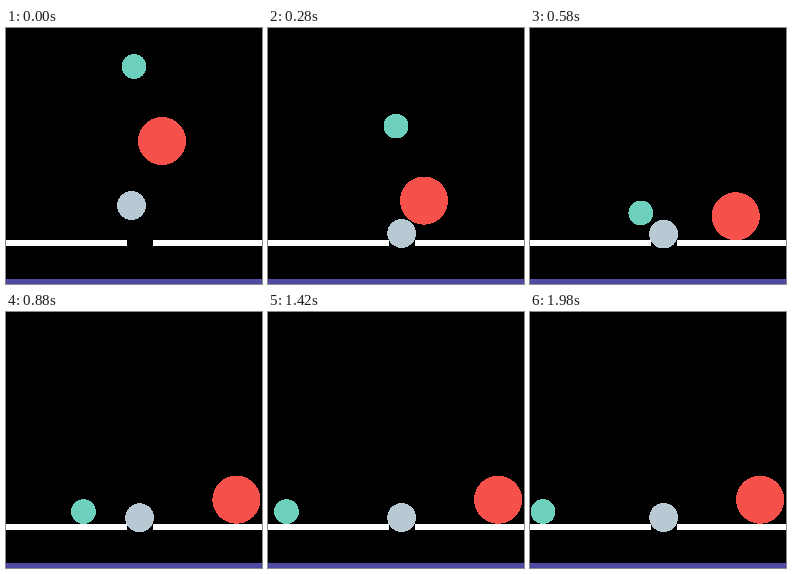
An HTML page with a canvas that plays this animation: 256x256 px, repeating every 2 s.

```html
<!DOCTYPE html>
<html lang="en">
<head>
<meta charset="utf-8">
<title>Falling balls</title>
<style>
  html, body { margin: 0; width: 100%; height: 100%; overflow: hidden; background: #000; }
  canvas { display: block; width: 256px; height: 256px; }
</style>
</head>
<body>
<canvas id="stage" width="256" height="256"></canvas>
<script>
const ctx = document.getElementById('stage').getContext('2d');
const LOOP = 2000, STEP = 20, HALF_G = 760;
const FLOOR = 212, GAP_LEFT = 121, GAP_RIGHT = 147;

// Moments of contact, in seconds
const GREY_LANDS = 0.165, RED_HITS = 0.284, GREEN_HITS = 0.428, RED_WALL = 0.736, GREEN_WALL = 1.475;

const fall = (y, v, t) => y + v * t + HALF_G * t * t;
const decay = (t, rate) => Math.exp(-t * rate);

// Drops onto the grey ball, glances left and rolls to the wall
function green(t) {
  const s = t - GREEN_HITS;
  if (s < 0) return [128, fall(38.5, 0, t)];
  const x = t < GREEN_WALL
    ? 128 - 113 * s + 2.6 * s * s
    : 13 - 0.6 * decay(t - GREEN_WALL, 20);
  return [Math.max(12.4, x), Math.min(199.6, fall(178, -70, s))];
}

// Glances right, sinks slightly into the floor and rebounds off the wall
function red(t) {
  const s = t - RED_HITS, w = t - RED_WALL;
  if (s < 0) return [156, fall(113, 0, t)];
  const rest = 187.7 + 1.5 * decay(t - 0.38, 5);
  if (w < 0) return [156 + 168 * s, Math.min(rest, fall(174.3, 155, s))];
  const rebound = decay(w, 12);
  return [230.1 + 1.8 * rebound, rest - rebound];
}

// Rolls over the left corner into the gap, then is nudged by the others
function grey(t) {
  if (t < GREY_LANDS) return [125.5, fall(177.5, 0, t)];
  if (t < RED_HITS) {
    const x = Math.min(133.6, 125.5 + 80 * (t - GREY_LANDS));
    return [x, FLOOR - Math.sqrt(14.2 ** 2 - (x - GAP_LEFT) ** 2)];
  }
  if (t < GREEN_HITS) return [131.9, 204.6];
  const s = t - GREEN_HITS;
  return [133.6 - 1.5 * decay(s, 30), 205.5 + 0.9 * decay(s, 3)];
}

// Hard-edged disc, drawn row by row
function ball([x, y], r, color) {
  ctx.fillStyle = color;
  for (let row = Math.floor(y - r); row <= y + r; row++) {
    const dy = row + 0.5 - y;
    if (Math.abs(dy) >= r) continue;
    const half = Math.sqrt(r * r - dy * dy);
    const left = Math.round(x - half);
    ctx.fillRect(left, row, Math.round(x + half) - left, 1);
  }
}

function bar(x, y, w, h, color) {
  ctx.fillStyle = color;
  ctx.fillRect(x, y, w, h);
}

function draw(ms) {
  const t = Math.floor((ms % LOOP) / STEP) * STEP / 1000;
  bar(0, 0, 256, 256, '#000');
  bar(0, FLOOR, GAP_LEFT, 6, '#fff');
  bar(GAP_RIGHT, FLOOR, 256 - GAP_RIGHT, 6, '#fff');
  bar(0, 251, 256, 5, '#4e4aa4');
  ball(green(t), 12.4, '#6cd0bc');
  ball(red(t), 24, '#f5504a');
  ball(grey(t), 14.4, '#b8c9d3');
}

const start = performance.now();
function tick() {
  draw(performance.now() - start);
  requestAnimationFrame(tick);
}
tick();
</script>
</body>
</html>
```
